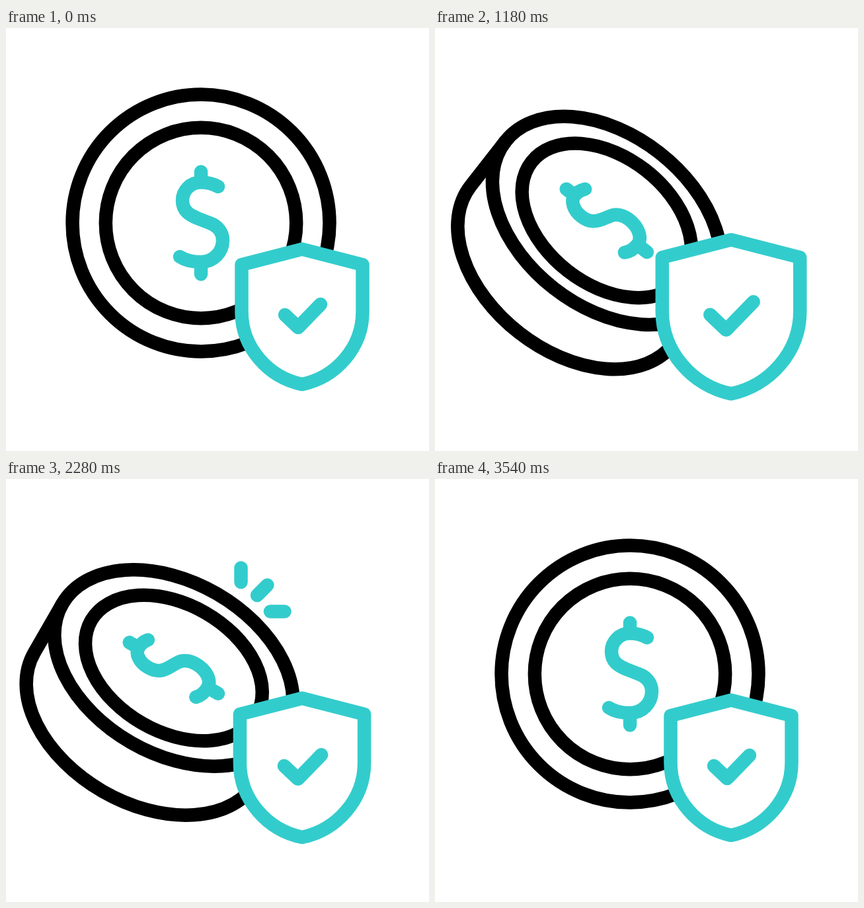
Write an HTML page with a canvas that moves like this. It is 640 px wide and 640 px high and loops after 3.6 s.

```html
<!DOCTYPE html>
<html lang="en">
<head>
<meta charset="utf-8">
<title>Protected coin</title>
<style>
  html, body { margin: 0; width: 100%; height: 100%; overflow: hidden; background: #fff; }
  canvas { display: block; width: 100vw; height: 100vh; }
</style>
</head>
<body>
<canvas id="stage" width="640" height="640"></canvas>
<script>
const ctx = document.getElementById('stage').getContext('2d');
const LOOP = 3600, BEAT = 800;
const INK = '#000', TEAL = '#33cccc';
const RIM = 194.5, RING = 144.2;

const dollar = new Path2D(
  'M26 -55C17 -60 9 -61.5 0 -61.5C-16 -61.5 -28 -49 -28 -34' +
  'C-28 -18 -17 -12 -5 -7L13 0C25 4 33 14 33 26C33 44 19 59 0 59C-13 59 -23 57 -32 51' +
  'M0 -77.5V-61.5M0 59V77.5');
const shield = new Path2D(
  'M0 -102L91.5 -78.5V-7C91.5 47 51 92 0 102.5C-51 92 -91.5 47 -91.5 -7V-78.5Z');
const tick = new Path2D('M-27 -1L-7 18L27 -17');

const clamp = x => Math.min(1, Math.max(0, x));
const span = (t, a, b) => clamp((t - a) / (b - a));
const ease = x => (1 - Math.cos(Math.PI * x)) / 2;
const hump = x => Math.sin(Math.PI * x) ** 2;

function place(path, matrix) {
  const out = new Path2D();
  out.addPath(path, matrix);
  return out;
}

// Transforms the path first, so the line keeps an even weight.
function stroke(path, color, matrix) {
  ctx.strokeStyle = color;
  ctx.stroke(place(path, matrix));
}

function drawCoin(t) {
  const tilt = ease(span(t, 0, 620)) * (1 - ease(span(t, 2955, 3545)));
  let sway = 0;
  if (t > 1200 && t < 3200) {
    const s = Math.sin((t - 1200) / BEAT * 2 * Math.PI);
    sway = s * (s > 0 ? 10 : 5);
  }
  const squash = 1 - 0.332 * tilt;
  const depth = 85.4 * tilt;
  const bow = 12.8 * tilt * (1 - tilt);
  const body = new DOMMatrix()
    .translate(295 - 61.5 * tilt + bow - 0.12 * sway, 295 + 30 * tilt + bow - 0.25 * sway)
    .rotate(-52 * tilt - sway)
    .translate(depth / 2, 0);
  const face = body.scale(squash, 1);

  if (depth > 0.3) {
    const side = new Path2D();
    side.moveTo(0, -RIM);
    side.lineTo(-depth, -RIM);
    side.ellipse(-depth, 0, RIM * squash, RIM, 0, -Math.PI / 2, Math.PI / 2, true);
    side.lineTo(0, RIM);
    stroke(side, INK, body);
  }
  for (const r of [RIM, RING]) {
    const ring = new Path2D();
    ring.arc(0, 0, r, 0, 2 * Math.PI);
    stroke(ring, INK, face);
  }
  stroke(dollar, TEAL, face);
}

function drawSparks(t) {
  if (t < 600) return;
  const beat = (t - 600) % BEAT;
  const head = span(beat, 0, 200), tail = span(beat, 200, 440);
  if (head <= tail) return;
  const rays = [[355.5, 156, 0, -53], [380, 176, 38, -38], [400, 200.5, 53, 0]];
  ctx.strokeStyle = TEAL;
  for (const [x, y, dx, dy] of rays) {
    ctx.beginPath();
    ctx.moveTo(x + dx * tail, y + dy * tail);
    ctx.lineTo(x + dx * head, y + dy * head);
    ctx.stroke();
  }
}

function drawShield(t) {
  const pulse = t > 800 && t < 3200 ? hump((t - 800) / BEAT) : 0;
  const hop = -12 * hump(span(t, 400, 800));
  const at = new DOMMatrix().translate(448, 436.6 + hop).scale(1 + 0.14 * pulse);
  ctx.fillStyle = '#fff';
  ctx.fill(place(shield, at));
  stroke(shield, TEAL, at);
  stroke(tick, TEAL, new DOMMatrix().translate(449, 435 + hop).scale(1 + 0.215 * pulse));
}

function draw(now) {
  const t = now % LOOP;
  ctx.fillStyle = '#fff';
  ctx.fillRect(0, 0, 640, 640);
  ctx.lineWidth = 20.5;
  ctx.lineCap = ctx.lineJoin = 'round';
  drawCoin(t);
  drawSparks(t);
  drawShield(t);
}

const start = performance.now();
function loop() {
  draw(performance.now() - start);
  requestAnimationFrame(loop);
}
loop();
</script>
</body>
</html>
```
